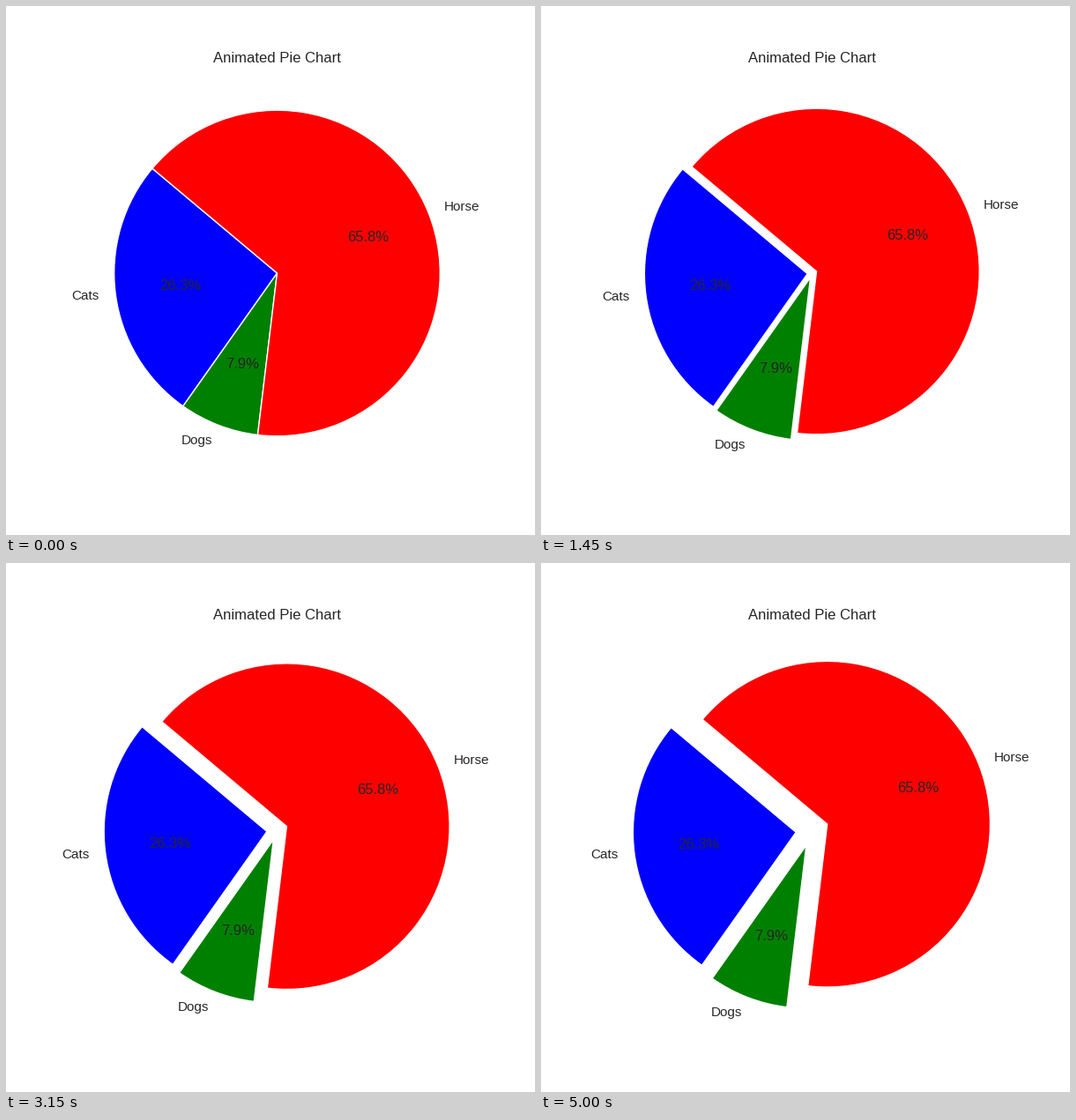
A matplotlib script for the animation above (5.05 s loop, 600 by 600 pixels).

```python
import matplotlib.pyplot as plt
from matplotlib.animation import FuncAnimation

FRAMES = 101
STEP_MS = 50
MAX_EXPLODE = 0.1

LABELS = ["Cats", "Dogs", "Horse"]
VALUES = [10, 3, 25]
COLORS = ["blue", "green", "red"]

plt.rcParams.update({
    "font.family": "Liberation Sans",
    "font.size": 12,
    "axes.titlesize": 12,
    "xtick.labelsize": 11,
    "text.color": "0.15",
    "patch.edgecolor": "white",
    "patch.linewidth": 1,
    "patch.force_edgecolor": True,
})

fig, ax = plt.subplots(figsize=(6, 6), dpi=100, facecolor="white")


def draw(i):
    """Pull every slice outward by a distance that grows linearly."""
    ax.clear()
    gap = MAX_EXPLODE * i / (FRAMES - 1)
    ax.pie(VALUES, labels=LABELS, colors=COLORS, explode=[gap] * len(VALUES),
           autopct="%1.1f%%", startangle=140,
           wedgeprops={"edgecolor": "white", "linewidth": 1})
    ax.set_title("Animated Pie Chart")


anim = FuncAnimation(fig, draw, frames=FRAMES, init_func=lambda: draw(0),
                     interval=STEP_MS, repeat=True, repeat_delay=0)
plt.show()
```
